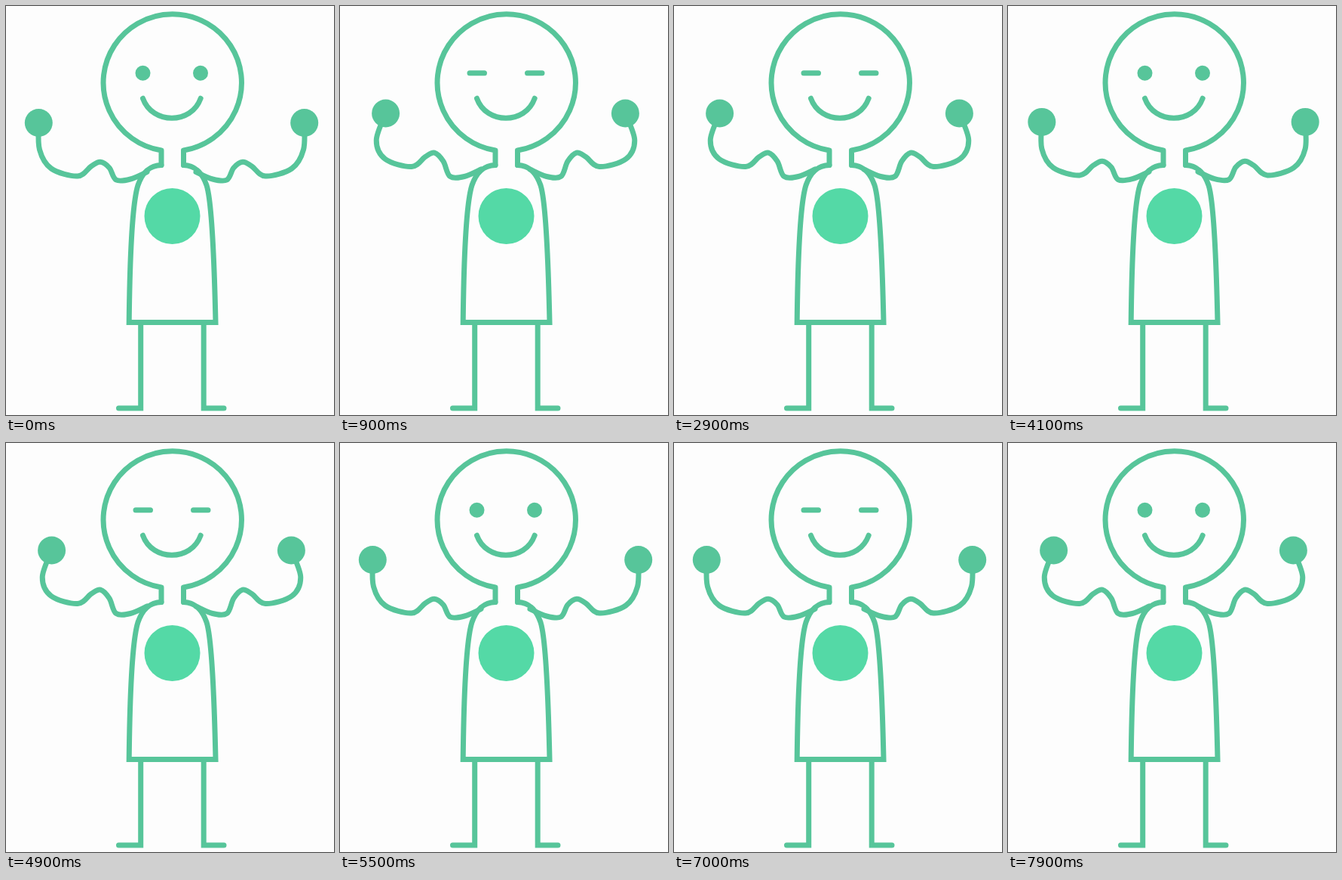
These frames come from a looping animation (435 px wide and 541 px high, 8000 ms). An HTML page:

```html
<!DOCTYPE html>
<html lang="en">
<head>
<meta charset="utf-8">
<title>Waving figure</title>
<style>
  html, body { margin: 0; width: 100%; height: 100%; overflow: hidden; background: #fdfdfd; }
  svg { display: block; width: 100vw; height: 100vh; }
  .line { fill: none; stroke: #57c59a; stroke-width: 7; stroke-linecap: round; }
  .dot { fill: #57c59a; }
</style>
</head>
<body>
<svg viewBox="0 0 435 541">
  <g class="line">
    <path d="M206 210.5V191A91.7 90.7 0 1 1 235.5 191V210.5" stroke-linejoin="round"/>
    <path d="M206 210.5C190 211 181 220 175 237C167 262 164 350 163.2 418.5H278C276.5 350 274 262 266 237C260 220 251 211 235.5 210.5"/>
    <path d="M178.7 419V532H149.5M262.2 419V532H289"/>
    <path d="M181.5 122.2C194 157 246 157 258.2 122.2"/>
    <path id="closed" d="M172 88.7H191.5M248.5 88.7H268"/>
  </g>
  <g id="open" class="dot">
    <circle cx="181.5" cy="88.7" r="10"/>
    <circle cx="258" cy="88.7" r="10"/>
  </g>
  <circle cx="220.5" cy="278" r="37" fill="#54d9a6"/>
  <g id="arm">
    <path class="line"/>
    <circle class="dot" r="18.5"/>
  </g>
  <use href="#arm" transform="matrix(-1 0 0 1 439 0)"/>
</svg>
<script>
  const LOOP = 8000, STEP = 100, SWING_STEPS = 5, BLINK_EVERY = 2000;
  // Key points of the lowered arm, from hand to shoulder.
  const ARM = [[43.3, 154.5], [44.5, 190], [60, 215], [95, 225], [113, 212],
    [125, 206.3], [137, 214], [146, 230], [165, 229], [187, 219.5]];
  const HAND_Y = ARM[0][1], ELBOW_Y = 210;

  const arm = document.querySelector('#arm path');
  const hand = document.querySelector('#arm circle');
  const openEyes = document.getElementById('open');
  const closedEyes = document.getElementById('closed');
  const show = (node, on) => node.setAttribute('visibility', on ? 'visible' : 'hidden');
  const easeInOut = u => u < 0.5 ? 4 * u ** 3 : 1 - 4 * (1 - u) ** 3;

  // Up and down once per swing; 0 is the lowered pose.
  function liftAt(tick) {
    const x = (tick % SWING_STEPS) * 2 / SWING_STEPS - 0.145;
    return 1.637 * (easeInOut(1 - Math.abs(1 - Math.abs(x))) - 0.0122);
  }

  // The forearm leans inward above the elbow; the rise fades toward the shoulder.
  function raise([x, y], lift) {
    const lean = 17.3 * (Math.max(0, ELBOW_Y - y) / (ELBOW_Y - HAND_Y)) ** 1.5;
    const rise = 3.5 + 9 / (1 + Math.exp((x - 138) / 4));
    return [x + lean * lift, y - rise * lift];
  }

  // Smooth curve through all points (Catmull-Rom as cubic segments).
  function smoothPath(points) {
    const at = i => points[Math.max(0, Math.min(points.length - 1, i))];
    const handle = (i, side) => at(i).map((v, k) => v + side * (at(i + 1)[k] - at(i - 1)[k]) / 6);
    let d = `M${points[0]}`;
    for (let i = 1; i < points.length; i++) {
      d += `C${handle(i - 1, 1)} ${handle(i, -1)} ${points[i]}`;
    }
    return d;
  }

  function draw(time) {
    const tick = Math.floor(time / STEP);
    const lift = liftAt(tick);
    const points = ARM.map(p => raise(p, lift));
    arm.setAttribute('d', smoothPath(points));
    hand.setAttribute('cx', points[0][0]);
    hand.setAttribute('cy', points[0][1]);

    const phase = (tick * STEP) % BLINK_EVERY;
    const blink = phase >= 900 && phase < 1100;
    show(openEyes, !blink);
    show(closedEyes, blink);
  }

  const start = performance.now();
  function frame() {
    draw((performance.now() - start) % LOOP);
    requestAnimationFrame(frame);
  }
  draw(0);
  requestAnimationFrame(frame);
</script>
</body>
</html>
```
